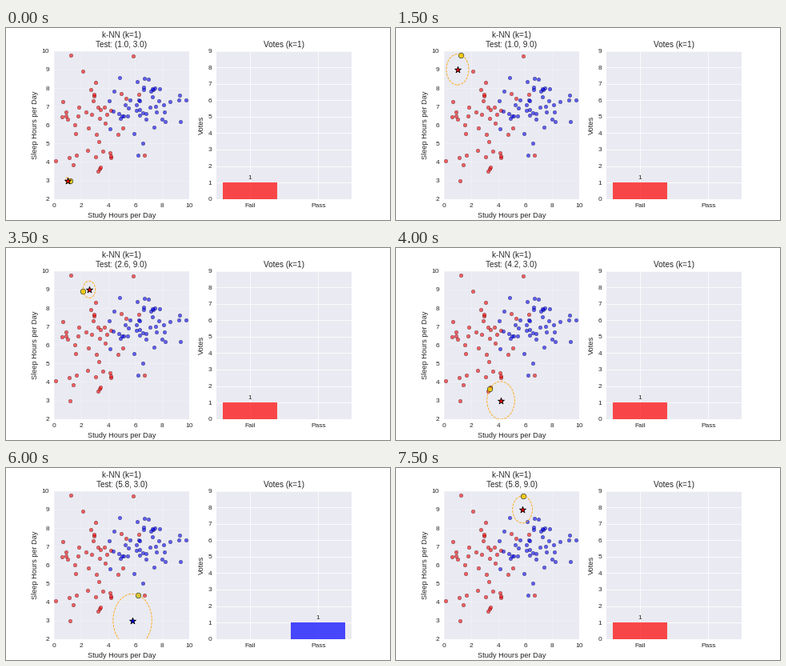
Write a matplotlib script that moves like this. It is 480 by 240 pixels and loops after 8 s.

```python
import itertools

import matplotlib.pyplot as plt
import numpy as np
from matplotlib.animation import FuncAnimation
from matplotlib.patches import Circle

plt.style.use("seaborn-v0_8")
plt.rcParams.update({
    "font.family": "Liberation Sans",
    "text.hinting": "force_autohint",
    "text.hinting_factor": 8,
})

K = 1
LABELS = ["Fail", "Pass"]
COLORS = ["red", "blue"]

# Students as (study hours, sleep hours); the passing half comes first.
rng = np.random.RandomState(42)
passed = np.column_stack([rng.normal(7, 1.5, 50), rng.normal(7, 1, 50)])
failed = np.column_stack([rng.normal(3, 1.5, 50), rng.normal(6, 2, 50)])
X = np.vstack([passed, failed])
y = np.repeat([1, 0], 50)

TESTS = list(itertools.product([1.0, 2.6, 4.2, 5.8], [3.0, 5.0, 7.0, 9.0]))

fig, (ax, ax_votes) = plt.subplots(1, 2, figsize=(8, 4), dpi=60)


def classify(point):
    """Return the k nearest indices, the largest distance and the votes."""
    dist = np.hypot(*(X - point).T)
    near = np.argsort(dist)[:K]
    return near, dist[near].max(), np.bincount(y[near], minlength=2)


def draw_space(point, near, radius, winner):
    ax.clear()
    for label, color in enumerate(COLORS):
        ax.scatter(*X[y == label].T, c=color, s=30, alpha=0.6,
                   edgecolors="k", linewidths=0.5)
    ax.scatter(*X[near].T, c="yellow", s=60, alpha=0.7, edgecolors="k", linewidths=1)
    ax.add_patch(Circle(point, radius, fill=False, color="orange", ls="--", lw=1))
    ax.scatter(*point, c=COLORS[winner], s=100, marker="*",
               edgecolors="k", linewidths=1, zorder=5)
    ax.set(xlim=(0, 10), ylim=(2, 10), xticks=range(0, 11, 2), yticks=range(2, 11),
           xlabel="Study Hours per Day", ylabel="Sleep Hours per Day")
    ax.set_title(f"k-NN (k={K})\nTest: ({point[0]:.1f}, {point[1]:.1f})")
    ax.grid(True, alpha=0.3)


def draw_votes(votes):
    ax_votes.clear()
    ax_votes.bar(LABELS, votes, color=COLORS, alpha=0.7)
    for i, n in enumerate(votes):
        if n:
            ax_votes.text(i, n + 0.1, str(n), ha="center", va="bottom")
    ax_votes.set(ylim=(0, 9), yticks=range(10), ylabel="Votes",
                 title=f"Votes (k={K})")


def update(frame):
    point = TESTS[frame]
    near, radius, votes = classify(point)
    draw_space(point, near, radius, votes.argmax())
    draw_votes(votes)
    return []


anim = FuncAnimation(fig, update, frames=len(TESTS), init_func=lambda: [],
                     interval=500, repeat=True, repeat_delay=0)
plt.show()
```
